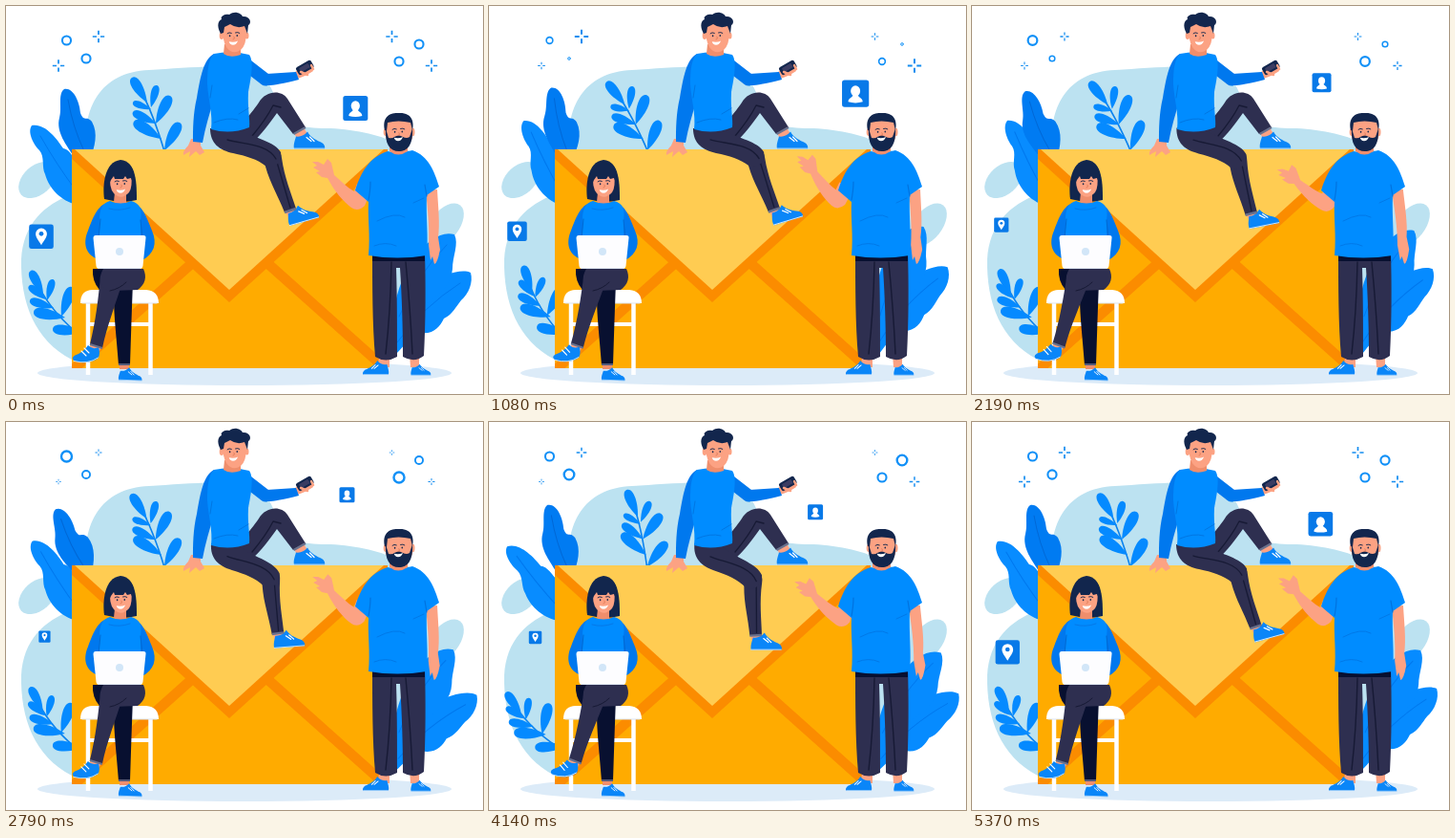
Animation of 500 by 406 pixels, one loop 5400 ms. Source, as an HTML page with a canvas:

```html
<!DOCTYPE html>
<html lang="en">
<head>
<meta charset="utf-8">
<title>Mail team</title>
<style>
html, body { margin: 0; width: 100%; height: 100%; overflow: hidden; background: #fff; }
canvas { display: block; width: 500px; height: 406px; }
</style>
</head>
<body>
<canvas id="stage"></canvas>
<script>
const canvas = document.getElementById('stage');
const ctx = canvas.getContext('2d');
const dpr = window.devicePixelRatio || 1;
canvas.width = 500 * dpr;
canvas.height = 406 * dpr;

const LOOP = 5400, STEP = 900;
const BLUE = '#008cff', DEEP = '#0078ee', PALE = '#bce2f1', SKIN = '#fca283', TAN = '#ef8e6c';
const HAIR = '#12264d', PANTS = '#2e2f50', NIGHT = '#081030', SEAM = '#171a35', WHITE = '#fff';

// Linear interpolation through values spaced one STEP apart; short lists repeat.
function key(t, ...v) {
  const p = t / STEP, i = Math.floor(p), n = v.length;
  const a = v[i % n], b = v[(i + 1) % n];
  return a + (b - a) * (p - i);
}

function fill(d, color) {
  ctx.fillStyle = color;
  ctx.fill(new Path2D(d));
}

function line(d, color, width, cap = 'round') {
  ctx.strokeStyle = color;
  ctx.lineWidth = width;
  ctx.lineCap = cap;
  ctx.lineJoin = 'round';
  ctx.stroke(new Path2D(d));
}

function oval(x, y, rx, ry, color, deg = 0) {
  ctx.fillStyle = color;
  ctx.beginPath();
  ctx.ellipse(x, y, rx, ry, deg * Math.PI / 180, 0, 7);
  ctx.fill();
}

function box(x, y, w, h, r, color) {
  ctx.fillStyle = color;
  ctx.beginPath();
  ctx.roundRect(x, y, w, h, r);
  ctx.fill();
}

function spin(x, y, deg, draw) {
  ctx.save();
  ctx.translate(x, y);
  ctx.rotate(deg * Math.PI / 180);
  ctx.translate(-x, -y);
  draw();
  ctx.restore();
}

function place(x, y, size, draw) {
  ctx.save();
  ctx.translate(x, y);
  ctx.scale(size, size);
  draw();
  ctx.restore();
}

function backdrop() {
  fill('M84 152C80 108 98 69 150 67C190 65 236 59 262 70C280 79 282 98 288 112C294 126 315 128 340 128' +
       'C396 131 446 150 450 200L449 262L400 370L69 370C30 350 15 310 16 265C18 228 40 208 69 197L84 152Z', PALE);
  oval(33, 182, 23, 15, PALE, -42);
  oval(460, 229, 26, 15, PALE, -52);
  oval(250, 384, 217, 13, '#dcebf8');
}

function ring(x, y, r) {
  ctx.strokeStyle = '#1190f7';
  ctx.lineWidth = 0.4 + r * 0.3;
  ctx.beginPath();
  ctx.arc(x, y, Math.max(0.5, r - ctx.lineWidth / 2), 0, 7);
  ctx.stroke();
}

function plus(x, y, r) {
  place(x, y, r, () => line('M-1 0H-.32M.32 0H1M0-1V-.32M0 .32V1', '#158df0', 0.28, 'butt'));
}

function sparks(t) {
  const slow = key(t, 5.6, 3.9, 5.3, 6.8, 6, 5.3);
  const wide = key(t, 5.6, 1.6, 2.6, 4.9, 5.9, 6.9);
  const big = key(t, 6.2, 7.6, 5.5, 3.4, 4.6, 5.8);
  const quick = key(t, 6.2, 3.6, 4.9, 2.6, 4.1, 2.1);
  ring(63.5, 36, slow);
  ring(412, 58, slow);
  ring(84, 55, wide);
  ring(433, 40, wide);
  plus(97, 32, big);
  plus(446, 62.5, big);
  plus(55, 62.5, quick);
  plus(404.5, 32, quick);
}

function leaf(x, y, tx, ty) {
  const dx = (tx - x) * 0.23, dy = (ty - y) * 0.23;
  const mx = x + (tx - x) * 0.5, my = y + (ty - y) * 0.5;
  ctx.fillStyle = '#058aff';
  ctx.beginPath();
  ctx.moveTo(x, y);
  ctx.bezierCurveTo(mx - dy, my + dx, tx - dy, ty + dx, tx, ty);
  ctx.bezierCurveTo(tx + dy, ty - dx, mx + dy, my - dx, x, y);
  ctx.fill();
}

function plants(t) {
  spin(163, 150, 20.3 - key(t, 20.3, 26, 31.5, 21.5, 14.5, 9), () => {
    line('M141 88Q154 112 166 152', '#0a82ee', 1.6);
    leaf(148, 101, 132, 75);
    leaf(152, 108, 133, 101);
    leaf(152, 106, 158, 83);
    leaf(157, 123, 133, 111);
    leaf(157, 123, 172, 94);
    leaf(163, 139, 134, 121);
    leaf(166, 151, 182, 122);
  });
  spin(68, 345, 31.5 - key(t, 31.5, 22.5, 27.5, 31.5, 36.5, 40), () => {
    line('M31 286Q43 315 72 340', '#0a82ee', 1.6);
    leaf(39, 302, 26, 277);
    leaf(42, 307, 24, 293);
    leaf(43, 308, 49, 286);
    leaf(50, 316, 25, 308);
    leaf(62, 326, 29, 320);
    leaf(58, 325, 69, 294);
    leaf(80, 341, 49, 338);
  });
  spin(75, 205, 30.4 - key(t, 30.4, 25, 19, 29, 39, 34.5), () => {
    fill('M27 125C22 132 29 145 35 151C41 158 37 168 41 176C45 191 58 204 74 208L82 170' +
         'C72 166 70 151 60 149C53 138 40 122 27 125Z', '#088cff');
    line('M36 136Q53 166 74 194', DEEP, 1);
  });
  spin(85, 150, 19.2 - key(t, 19.2, 14, 21.2, 28.5, 20, 18), () => {
    fill('M70 156C64 146 52 132 56 117C59 107 54 92 61 87C70 85 77 99 78 112C82 122 84 114 90 121C97 133 93 148 88 160Z', '#007bf2');
    line('M65 98Q70 127 82 152', '#0068d6', 1);
  });
  spin(405, 365, key(t, 43.6, 40.5, 35.5, 48, 49, 46) - 43.6, () => {
    fill('M487 279C477 274 458 282 447 288C435 291 428 300 423 312C410 326 402 346 404 368' +
         'C414 362 420 347 434 342C449 344 455 335 459 327C468 323 472 314 477 308C485 301 490 289 487 279Z', '#068bff');
    line('M476 290Q437 315 410 352', DEEP, 1);
  });
  spin(405, 340, key(t, 33.4, 25, 27.5, 32.5, 35, 36) - 33.4, () => {
    fill('M470 239C456 235 442 246 432 259C415 278 406 309 403 342C422 338 432 323 443 310' +
         'C457 300 467 290 468 275C468 262 475 249 470 239Z', '#068bff');
    line('M462 250Q431 281 412 325', DEEP, 1);
  });
}

function envelope() {
  ctx.save();
  ctx.beginPath();
  ctx.rect(69, 150, 331, 229);
  ctx.clip();
  fill('M69 150H400V379H69Z', '#ffab00');
  line('M194 270L65 385M275 270L404 385', '#fb8c00', 10.5);
  fill('M69 150H400V160L234 310L69 160Z', '#fb8c00');
  fill('M72 150H396L234 297Z', '#ffcc52');
  ctx.restore();
}

function badge(x, y, size, draw) {
  place(x, y, size / 26, () => {
    box(-13, -13, 26, 26, 2.5, '#0879e8');
    draw();
  });
}

function badges(t) {
  const px = key(t, 37, 30.7, 24.5, 39, 53.5, 45.2);
  const py = key(t, 241.3, 236.7, 232, 225.2, 218.5, 230);
  badge(px, py, key(t, 25.6, 21.4, 17.2, 12.7, 8.2, 17), () => {
    fill('M0 9C-3 4-6 1-6-3A6 6 0 0 1 6-3C6 1 3 4 0 9Z', WHITE);
    oval(0, -3, 2.4, 2.4, '#0879e8');
  });
  const ux = key(t, 366.3, 387, 372.7, 358.5, 348.2, 338);
  const uy = key(t, 107, 93.5, 84.3, 75, 87, 99);
  badge(ux, uy, key(t, 26, 29.5, 23, 16, 16, 16), () => {
    fill('M-7 8C-7 4-3 4-2 1H2C3 4 7 4 7 8Q0 10-7 8Z', WHITE);
    oval(0, -2.5, 4.6, 5.2, WHITE);
  });
}

// Small shared features, centred between eyes and mouth.
function features(x, y) {
  place(x, y, 0.85, () => {
    line('M-7-5Q-5-7-2-5.5M3-6Q6-7 8-5.5', HAIR, 1.1);
    oval(-4, -2, 0.9, 1.2, HAIR);
    oval(5, -2.3, 0.9, 1.2, HAIR);
    line('M1-1Q3 2 0 2.3', '#d8734f', 0.9);
    fill('M-5 5Q1 6.5 6 4Q4 9 0 9Q-4 9-5 5Z', WHITE);
  });
}

// Sneaker pointing right, sole at y = 0, heel at x = 0.
function shoe(x, y, deg, size = 1, flip = 1) {
  ctx.save();
  ctx.translate(x, y);
  ctx.rotate(deg * Math.PI / 180);
  ctx.scale(size * flip, size);
  fill('M0 0C-1-5 1-9 2-13Q9-12 14-18C18-11 24-9 29-6.5Q33-4 32 0Z', '#0a86f8');
  line('M0-.4H31.5', '#d5e9fb', 0.9);
  line('M13-12L18-8M16.5-12.5L21-8', WHITE, 1.2);
  ctx.restore();
}

function sitter(t) {
  // hand resting on the envelope
  fill('M194 139L191 146Q185 152 186 156L193 152L192 158L199 152L203 156L208 153L204 146L204 139Z', SKIN);
  // raised leg
  fill('M302 132L312 127L316 134L305 140Z', SKIN);
  shoe(302, 149.5, 0);
  fill('M222 132C244 131 255 115 265 101C272 89 288 87 295 97L314 127L301 134L284 112C274 126 263 141 250 149Z', PANTS);
  line('M258 136Q273 118 280 104L288 106', SEAM, 1.3);
  line('M301.5 134L314 127', '#69718d', 2.4, 'butt');

  // hanging leg: thigh follows the shin a little
  const bend = key(t, 0, -1, 0, 11, 16, 16);
  spin(225, 140, bend * 0.42, () => {
    spin(279, 160, bend * 0.58, () => {
      fill('M292 214L302 211L304 218L296 221Z', SKIN);
      shoe(297.5, 230, -16);
      fill('M270 155C272 145 288 146 289 159C292 180 299 196 304 212L292 216C285 198 277 186 272 168Z', PANTS);
      line('M283 160L298 211', SEAM, 1.3);
      line('M292 216L304 212', '#69718d', 2.4, 'butt');
    });
    fill('M214 128C214 144 224 151 238 154C252 157 263 160 273 168C283 170 290 163 288 153C282 142 262 139 246 130Z', PANTS);
    line('M232 140C250 145 274 144 283 160', SEAM, 1.3);
  });

  // torso and arms
  fill('M218 50C207 56 204 73 200 96C196 113 196 129 196 142L206 143C209 127 213 113 218 98Z', DEEP);
  line('M250 60L272 77', DEEP, 13);
  const lift = t < 2160 ? 12 * Math.sin(2 * Math.PI * t / 2160) : 0;
  spin(271, 78, -lift, () => {
    fill('M303 69L312 63Q319 58 320 62L322 68Q315 73 305 76Z', SKIN);
    fill('M264 77L273 71L304 69L307 77Q283 83 275 83Q267 84 264 77Z', DEEP);
    spin(313, 64, -30, () => {
      box(304, 60, 18, 9, 2, HAIR);
      box(307, 62, 11, 5, 1, '#3a3c62');
    });
    line('M309 69L316 72M320 62L322 66', SKIN, 2.5);
  });
  fill('M218 50Q237 46 255 51C260 58 257 75 254 90C253 107 256 119 255 127Q235 135 215 129C217 113 212 98 211 82C211 68 212 56 218 50Z', BLUE);
  line('M216 83L214 96M244 113L254 107M218 122Q232 116 243 119', '#0077e3', 1);

  // head
  fill('M229 40L246 42L246 51Q235 55 228 50Z', TAN);
  fill('M227 23Q227 14 240 14Q252 15 252 27Q252 41 246 46Q240 50 235 47Q227 42 227 23Z', SKIN);
  oval(226, 31, 2.3, 4, SKIN);
  oval(252.5, 31, 2, 3.6, SKIN);
  fill('M225 29C220 20 223 15 226 14C224 10 231 8 234 9C240 4 247 8 248 11C256 10 258 18 254 20L253 29L250 21Q242 24 235 19L229 22L228 28Z', HAIR);
  features(238, 33);
}

function stool() {
  line('M86 304V386M151.5 304V386', WHITE, 4.5, 'butt');
  line('M86 333H151', WHITE, 4, 'butt');
  fill('M78 311Q78 297 91 297H147Q160 298 160 311Z', WHITE);
  line('M80 311H158', '#dce5f1', 1);
}

function woman(t) {
  stool();
  // planted leg
  fill('M119 370H129V380L119 380Z', TAN);
  shoe(118, 391.5, 2, 0.76);
  fill('M91 275H112V297H98Q90 288 91 275Z', NIGHT);
  fill('M112 286L133 289C132 313 131 344 130 376H118C116 348 113 325 113 304Z', NIGHT);
  line('M118 375H130', '#535a79', 2, 'butt');
  // crossed leg
  spin(108, 290, key(t, 0, 1, 5.5), () => {
    fill('M89 354L100 357L97 363L87 361Z', SKIN);
    fill('M86 355Q91 360 97 357Q99 363 97 368C91 373 80 375 71 371Q67 367 76 364Q82 361 86 355Z', '#0a86f8');
    line('M71 371.5Q86 375.5 96.5 368', '#d5e9fb', 0.9);
    line('M79 361L84 366M82 358L87 363', WHITE, 1.1);
    fill('M99 282C97 305 94 330 88 354L101 358C106 334 115 312 122 289Z', PANTS);
    line('M88 354L101 358', '#69718d', 2.2, 'butt');
  });
  fill('M102 275C96 285 98 297 111 298L138 297Q150 288 144 275Z', PANTS);
  line('M109 298Q119 296 126 289', SEAM, 1);

  // hair behind, neck, body
  fill('M103 202C101 188 103 163 120 161C137 162 137 187 137 203Q122 207 103 202Z', HAIR);
  fill('M114 195H126V206Q119 210 113 205Z', TAN);
  fill('M109 205C97 207 92 219 86 235C80 249 84 260 96 265L108 240ZM131 205C143 208 147 220 153 235C159 249 155 259 143 266L130 240Z', DEEP);
  fill('M109 204Q120 209 131 204C140 206 143 213 141 224V262H98V224C98 213 101 206 109 204Z', BLUE);
  line('M99 223L97 243M141 224L143 243', '#0069d2', 1);
  line('M108 212Q119 215 130 211', '#0579e8', 1);

  // laptop
  fill('M94 240H144Q147 240 146.500 243L143.500 272Q143 275 140 275H98Q95 275 94.500 272L91.500 243Q91.500 240 94 240Z', '#fdfdff');
  line('M97 274.500H141', '#dfe7f3', 1);
  oval(119, 257, 4, 4, '#d2e6f8');

  // face and fringe
  fill('M109 175H131Q133 189 129 195Q121 204 113 196Q108 191 109 175Z', SKIN);
  features(120, 188);
  fill('M107 190C103 171 110 163 121 163C132 164 136 173 134 188L131 180L127 181L125 178L123 181L114 181L113 178L110 182Z', HAIR);
}

function standing(t) {
  // ankles and shoes
  fill('M391 365H402V378H390ZM423 364H433V378H424Z', SKIN);
  shoe(401, 386, 0, 0.84, -1);
  shoe(424.5, 386.5, 0, 0.65);
  // trousers
  fill('M384 258H439C440 290 440 330 438 366Q428 374 416 367C416 338 415 305 413 274H409' +
       'C410 305 410 338 410 367Q398 374 387 367C384 333 384 292 384 258Z', PANTS);
  fill('M384 260H439V267H384Z', NIGHT);
  line('M404 268Q403 320 398 364M419 268Q424 320 426 364', SEAM, 1.4);

  // hanging arm
  spin(447, 195, key(t, 0, 2.4, -5.5), () => {
    fill('M440 193L452 192C453 210 455 228 453 242L455 255Q452 270 449 270L447 262L445 266L443 250C444 232 442 212 440 193Z', SKIN);
  });
  // raised arm
  spin(384, 178, key(t, 0, 10, -13), () => {
    fill('M368 186L384 190L376 209Q369 216 362 211C353 204 345 195 337 180L331 179L325 174L329 173L322 169L326 167L321 163' +
         'L327 163L333 166L337 160L341 164L344 177C352 184 358 190 365 194Z', SKIN);
  });

  // shirt
  fill('M400 152Q412 155 426 151C443 157 449 173 454 189L441 198C440 221 443 242 441 261Q410 266 380 261C382 240 379 221 380 205L366 193C372 174 381 158 400 152Z', BLUE);
  line('M380 203Q382 192 382 184M441 199L439 187', '#0073df', 1.2);
  line('M389 225Q408 215 418 221M427 206L438 201M386 251Q398 246 409 251', '#0079e8', 1);

  // head
  fill('M402 143H421V152Q411 159 402 152Z', TAN);
  oval(398, 132, 2.3, 4, SKIN);
  oval(426.5, 132, 2, 4.2, SKIN);
  fill('M398 120H426V138Q422 149 412 150Q401 148 398 137Z', SKIN);
  fill('M397 130C394 116 402 111 413 112C426 112 428 122 426 130L424 122Q411 119 400 122L399 131Z', HAIR);
  fill('M398 128L401 138Q405 139 407 137Q412 134 416 137Q420 139 423 137L426 128C427 145 421 152 412 152C402 152 397 144 398 128Z', HAIR);
  features(411, 133.5);
}

function draw(now) {
  const t = now % LOOP;
  ctx.setTransform(dpr, 0, 0, dpr, 0, 0);
  ctx.fillStyle = WHITE;
  ctx.fillRect(0, 0, 500, 406);
  backdrop();
  sparks(t);
  plants(t);
  envelope();
  badges(t);
  sitter(t);
  woman(t);
  standing(t);
}

let start;
function loop(now) {
  start ??= now;
  draw(now - start);
  requestAnimationFrame(loop);
}
draw(0);
requestAnimationFrame(loop);
</script>
</body>
</html>
```
